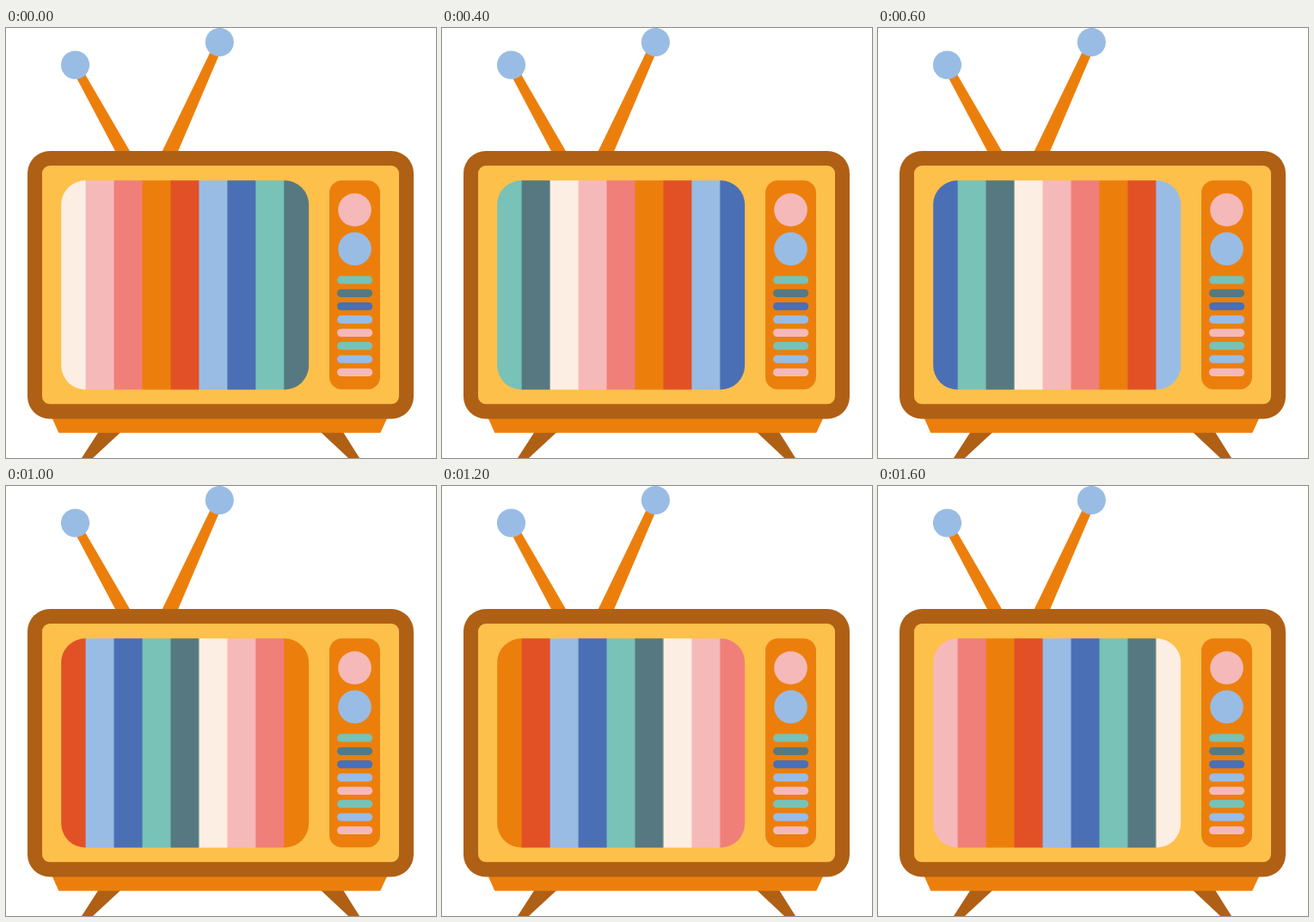
These frames come from a looping animation (500x500 px, 1700 ms). An HTML page:

```html
<!DOCTYPE html>
<html lang="en">
<head>
<meta charset="utf-8">
<title>Retro television</title>
<style>
  :root {
    --cream: #fdeee3; --pink: #f6b9ba; --coral: #f07f79;
    --orange: #ec7f0c; --red: #e25126; --sky: #99bce5;
    --blue: #4a6fb5; --teal: #78c2b7; --slate: #567981;
    --brown: #af6015; --yellow: #fdc04b;
    --step: 32.95px;
  }
  html, body { margin: 0; width: 100%; height: 100%; overflow: hidden; background: #fff; }
  svg { display: block; width: 100%; height: 100%; }

  .cream { fill: var(--cream); } .pink { fill: var(--pink); } .coral { fill: var(--coral); }
  .orange { fill: var(--orange); } .red { fill: var(--red); } .sky { fill: var(--sky); }
  .blue { fill: var(--blue); } .teal { fill: var(--teal); } .slate { fill: var(--slate); }
  .brown { fill: var(--brown); } .yellow { fill: var(--yellow); }

  /* One stripe to the right every 200 ms; the last pose holds for 100 ms */
  .stripes { animation: shift 1700ms step-end infinite; }
  @keyframes shift {
    0% { transform: translateX(0); }
    11.764% { transform: translateX(var(--step)); }
    23.529% { transform: translateX(calc(2 * var(--step))); }
    35.294% { transform: translateX(calc(3 * var(--step))); }
    47.058% { transform: translateX(calc(4 * var(--step))); }
    58.823% { transform: translateX(calc(5 * var(--step))); }
    70.588% { transform: translateX(calc(6 * var(--step))); }
    82.352% { transform: translateX(calc(7 * var(--step))); }
    94.117%, 100% { transform: translateX(calc(8 * var(--step))); }
  }
</style>
</head>
<body>
<svg viewBox="0 0 500 500">
  <defs>
    <clipPath id="screen"><rect x="64.2" y="177.3" width="287.9" height="243.1" rx="28"/></clipPath>
    <!-- Stripes overlap by 1px so no seam shows -->
    <g id="set">
      <rect class="cream" x="59.65" y="170" width="33.95" height="260"/>
      <rect class="pink" x="92.6" y="170" width="33.95" height="260"/>
      <rect class="coral" x="125.55" y="170" width="33.95" height="260"/>
      <rect class="orange" x="158.5" y="170" width="33.95" height="260"/>
      <rect class="red" x="191.45" y="170" width="33.95" height="260"/>
      <rect class="sky" x="224.4" y="170" width="33.95" height="260"/>
      <rect class="blue" x="257.35" y="170" width="33.95" height="260"/>
      <rect class="teal" x="290.3" y="170" width="33.95" height="260"/>
      <rect class="slate" x="323.25" y="170" width="33.95" height="260"/>
    </g>
    <rect id="slot" x="385" y="288.3" width="41.2" height="9.3" rx="4.65"/>
  </defs>

  <g class="orange">
    <path d="M82 58 91.500 53 144.500 144H127.500z"/>
    <path d="M237.500 28 247.500 32 199.800 144H181.300z"/>
  </g>
  <g class="sky">
    <circle cx="80.500" cy="43" r="16.600"/>
    <circle cx="248.300" cy="16.500" r="16.600"/>
  </g>

  <g class="brown">
    <path d="M108 469H134.500L101 500H88z"/>
    <path d="M365 469H391.500L411 500H398z"/>
  </g>
  <path class="orange" d="M53 452H444L435.300 470.700H61.300z"/>

  <rect class="brown" x="25" y="143" width="449" height="311.500" rx="26"/>
  <rect class="yellow" x="42" y="160" width="415" height="277.300" rx="9"/>

  <g clip-path="url(#screen)">
    <g class="stripes">
      <use href="#set" x="-296.550"/>
      <use href="#set"/>
    </g>
  </g>

  <rect class="orange" x="376" y="177.300" width="59" height="243" rx="14.500"/>
  <circle class="pink" cx="405.500" cy="211.500" r="19.300"/>
  <circle class="sky" cx="405.500" cy="256.800" r="19.300"/>
  <use href="#slot" class="teal"/>
  <use href="#slot" class="slate" y="15.350"/>
  <use href="#slot" class="blue" y="30.700"/>
  <use href="#slot" class="sky" y="46.050"/>
  <use href="#slot" class="pink" y="61.400"/>
  <use href="#slot" class="teal" y="76.750"/>
  <use href="#slot" class="sky" y="92.100"/>
  <use href="#slot" class="pink" y="107.450"/>
</svg>
</body>
</html>
```
